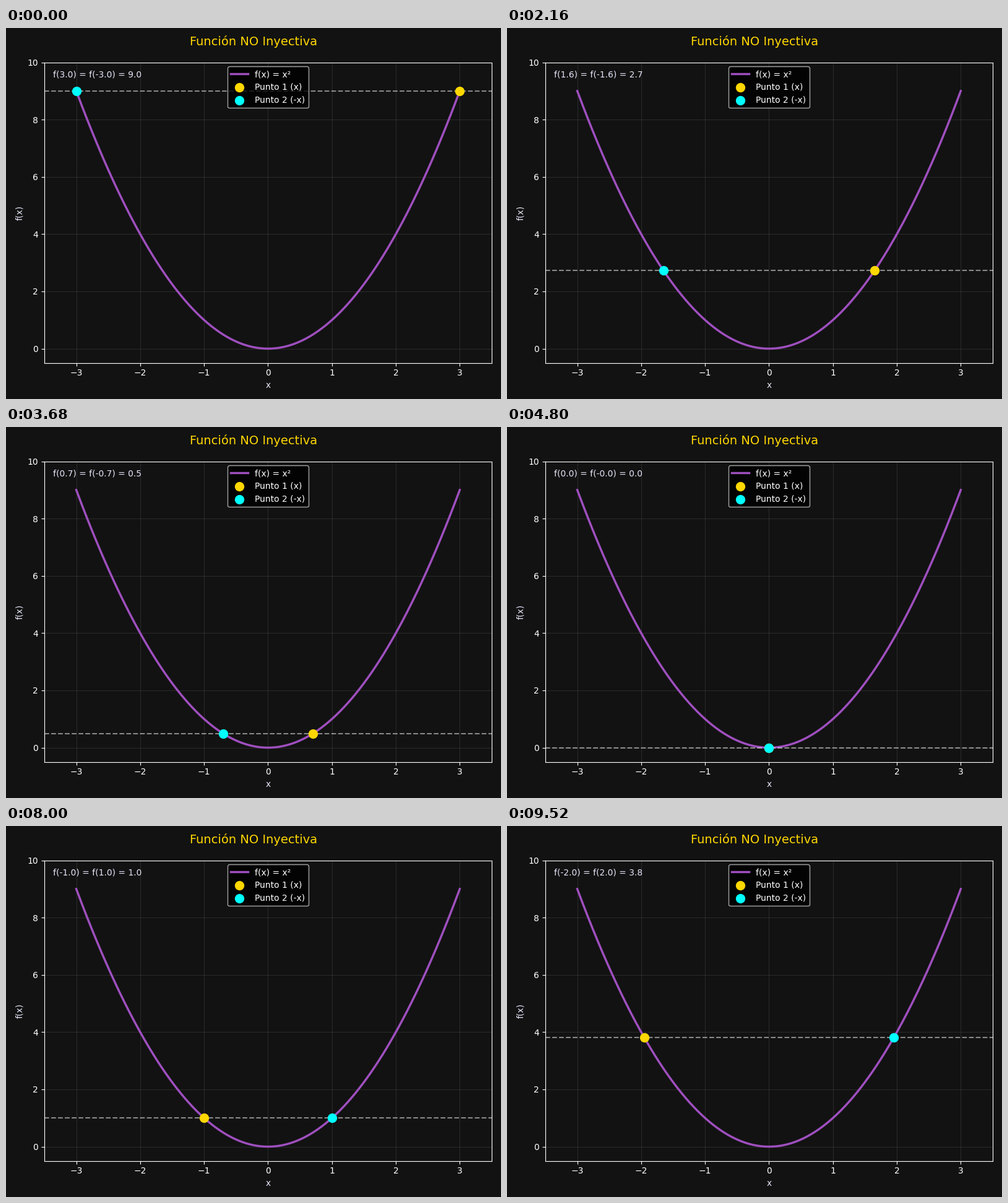
Animation, 800 px wide and 600 px high, one loop 9.6 s. Source, as a matplotlib script:

```python
import numpy as np
import matplotlib.pyplot as plt
from matplotlib.animation import FuncAnimation

plt.style.use("dark_background")

BG = "#121212"
GOLD = "#FFD700"
CYAN = "#00FFFF"
PURPLE = "#9F4FBF"
PALE = "#E6E6FA"

FRAMES, INTERVAL = 120, 80
STEP = 0.05
HOLD_START, HOLD_LEN = 80, 20


def f(x):
    return x ** 2


def x_at(frame):
    """Steady slide to the left from x = 3, with a rest at x = -1."""
    if frame >= HOLD_START:
        frame = max(HOLD_START, frame - HOLD_LEN)
    return 3 - STEP * frame


fig, ax = plt.subplots(figsize=(8, 6), dpi=100, facecolor=BG)
ax.set_facecolor(BG)
ax.set_xlim(-3.5, 3.5)
ax.set_ylim(-0.5, 10)
ax.set_xlabel("x", color=PALE)
ax.set_ylabel("f(x)", color=PALE)
ax.grid(True, color="white", alpha=0.1)
fig.suptitle("Función NO Inyectiva", color=GOLD, fontsize=14)

xs = np.linspace(-3, 3, 400)
ax.plot(xs, f(xs), color=PURPLE, lw=2.5, label="f(x) = x²")
right = ax.scatter([3], [9], s=100, color=GOLD, zorder=5, label="Punto 1 (x)")
left = ax.scatter([-3], [9], s=100, color=CYAN, zorder=5, label="Punto 2 (-x)")
level = ax.axhline(9, color="white", ls="--", lw=1.5, alpha=0.5)
status = ax.text(0.02, 0.95, "", transform=ax.transAxes, color=PALE)
ax.legend(loc="upper center")
fig.tight_layout()


def update(frame):
    x = x_at(frame)
    y = f(x)
    right.set_offsets([[x, y]])
    left.set_offsets([[-x, y]])
    level.set_ydata([y, y])
    status.set_text(f"f({x:.1f}) = f({-x:.1f}) = {y:.1f}")
    return right, left, level, status


anim = FuncAnimation(fig, update, frames=FRAMES, interval=INTERVAL,
                     repeat=True, repeat_delay=0, blit=False)
plt.show()
```
